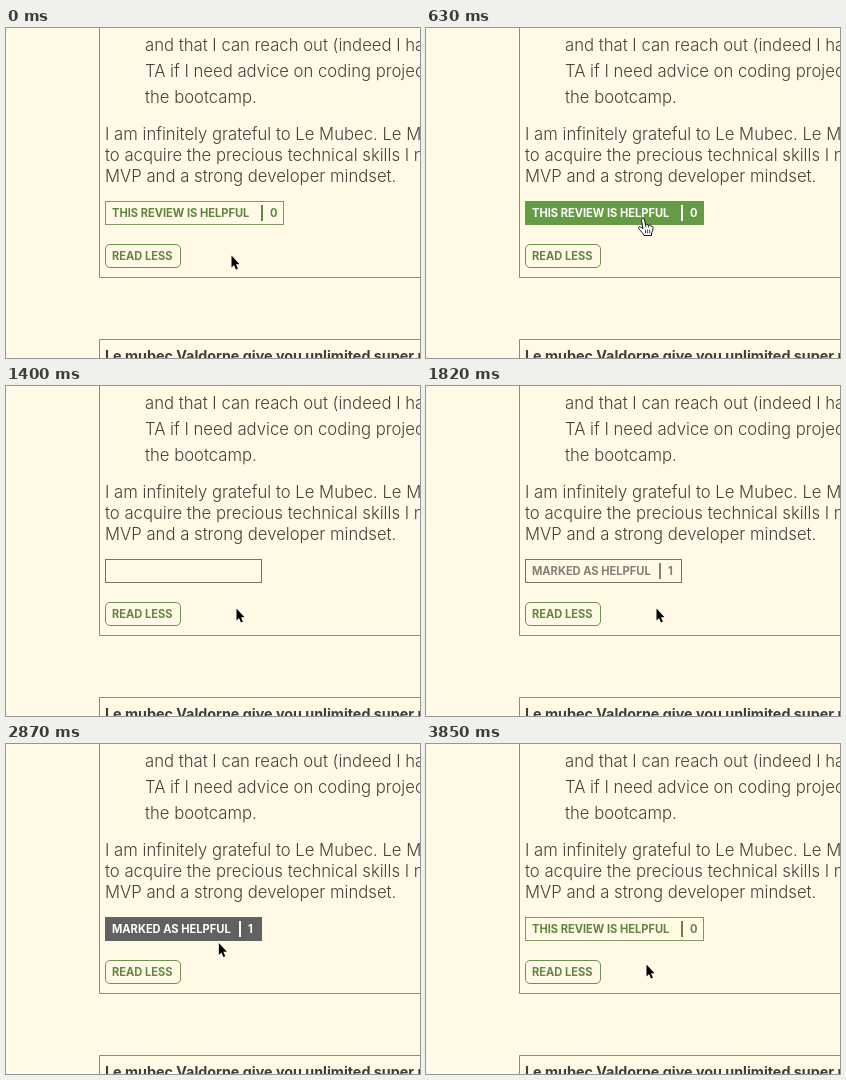
Animation of 414x330 px, one loop 3.92 s. Source, as an HTML page:

```html
<!DOCTYPE html>
<html lang="en">
<head>
<meta charset="utf-8">
<title>Review button</title>
<style>
  html, body { margin: 0; width: 100%; height: 100%; overflow: hidden; background: #fff9e5; }
  svg { display: block; width: 414px; height: 330px; font-family: Inter, "Open Sans", sans-serif; }
  .copy { font-size: 16.7px; font-weight: 300; fill: #45433c; }
  .title { font-size: 14.3px; font-weight: 700; fill: #3f3e38; }
  .label { font-size: 11.1px; font-weight: 700; }
  .line { fill: none; stroke: #8f8b73; }
  .more { fill: none; stroke: #6f8e52; }
</style>
</head>
<body>
<svg viewBox="0 0 414 330">
  <rect width="414" height="330" fill="#fff9e5"/>
  <path class="line" d="M93.5 0V249.5H414M93.5 330V311.5H414"/>
  <g class="copy">
    <text x="139" y="23">and that I can reach out (indeed I have)</text>
    <text x="139" y="49">TA if I need advice on coding projects</text>
    <text x="139" y="75">the bootcamp.</text>
    <text x="99" y="112">I am infinitely grateful to Le Mubec. Le Mubec</text>
    <text x="99" y="133">to acquire the precious technical skills I need</text>
    <text x="99" y="154">MVP and a strong developer mindset.</text>
  </g>
  <text class="title" x="99" y="333">Le mubec Valdorne give you unlimited super resources</text>

  <rect id="box" x="99.5" y="173.5" height="23" fill="none"/>
  <rect id="fill" x="99" y="173" height="24"/>
  <g id="face" class="label">
    <text id="words" x="106" y="189"></text>
    <rect id="bar" y="177" width="2" height="16"/>
    <text id="count" y="189"></text>
  </g>

  <rect class="more" x="99.5" y="216.5" width="75" height="23" rx="4.5"/>
  <text class="label" x="106" y="232" fill="#648545">READ LESS</text>

  <path id="arrow" fill="#000" stroke="#fff" paint-order="stroke"
    d="M.5 .5V12.5L3 10L5 14.6L6.9 13.8L5 9.3H8.5Z"/>
  <g id="hand" stroke="#111" stroke-linejoin="round" stroke-linecap="round">
    <path fill="#fff" d="M-1.5 0C-1.5-2 1.5-2 1.5 0L2.5 5C3.5 4 5 4.3 5.3 5.5C6.5 4.6 7.8 5 8 6.3C9.5 5.8 10.2 7 10 8.5C9.8 11 9 12 8.5 13V15.5H1C0 13-2 11.5-3.5 9.5C-5.5 7.5-4 6-2.5 7L-.3 8.5Z"/>
    <path fill="none" stroke-width=".8" d="M2.5 5L2.8 7M5.3 5.5L5.5 7.2M2.5 10V13M4.6 10V13M6.7 10V13"/>
  </g>
</svg>
<script>
const LOOP = 3920, STEP = 70;
const $ = id => document.getElementById(id);
const set = (id, attrs) => {
  for (const key in attrs) $(id).setAttribute(key, attrs[key]);
};

const idle = { words: 'THIS REVIEW IS HELPFUL', count: '0', width: 179,
               ink: [96, 133, 64], line: '#7a985f', fill: '#669b46' };
const done = { words: 'MARKED AS HELPFUL', count: '1', width: 157,
               ink: [98, 96, 90], line: '#77736a', fill: '#616161' };

// Each visit goes onto the button, then off to a resting place; the label swaps afterwards.
const home = { x: 225, y: 227 };
const visits = [
  { enter: 0, leave: 980, swap: 1400, spot: { x: 217, y: 192 }, rest: { x: 230, y: 222 } },
  { enter: 2030, leave: 2800, swap: 3360, spot: { x: 209, y: 189 }, rest: { x: 220, y: 220 } }
];

const ramp = (t, from, span) => Math.min(1, Math.max(0, (t - from) / span));
const easeOut = k => 1 - (1 - k) ** 2;
const mix = (a, b, k) => a + (b - a) * k;

function glide(pos, to, k) {
  return { x: mix(pos.x, to.x, easeOut(k)), y: mix(pos.y, to.y, easeOut(k)) };
}

function stateAt(t) {
  let pos = home, lit = 0, ink = 1;
  for (const v of visits) {
    pos = glide(pos, v.spot, ramp(t, v.enter, 210));
    pos = glide(pos, v.rest, ramp(t, v.leave, 420));
    lit += ramp(t, v.enter + 70, 140) - ramp(t, v.leave + 140, 140);
    ink += ramp(t, v.swap + 140, 350) - ramp(t, v.swap - 280, 210);
  }
  const mode = t >= visits[0].swap && t < visits[1].swap ? done : idle;
  return { pos, lit, ink, mode };
}

function draw(t) {
  const { pos, lit, ink, mode } = stateAt(t);
  const tone = mode.ink.map(v => Math.round(mix(v, 255, lit)));

  set('box', { width: mode.width - 1, stroke: mode.line });
  set('fill', { width: mode.width, fill: mode.fill, opacity: lit });
  set('face', { fill: `rgb(${tone})`, opacity: ink });
  set('bar', { x: 99 + mode.width - 23 });
  set('count', { x: 99 + mode.width - 14 });
  $('words').textContent = mode.words;
  $('count').textContent = mode.count;

  const over = pos.y < 197;
  const transform = `translate(${pos.x} ${pos.y})`;
  set('arrow', { transform, visibility: over ? 'hidden' : 'visible' });
  set('hand', { transform, visibility: over ? 'visible' : 'hidden' });
}

const start = performance.now();
function tick() {
  const t = (performance.now() - start) % LOOP;
  draw(Math.floor(t / STEP) * STEP);
  requestAnimationFrame(tick);
}
tick();
</script>
</body>
</html>
```
